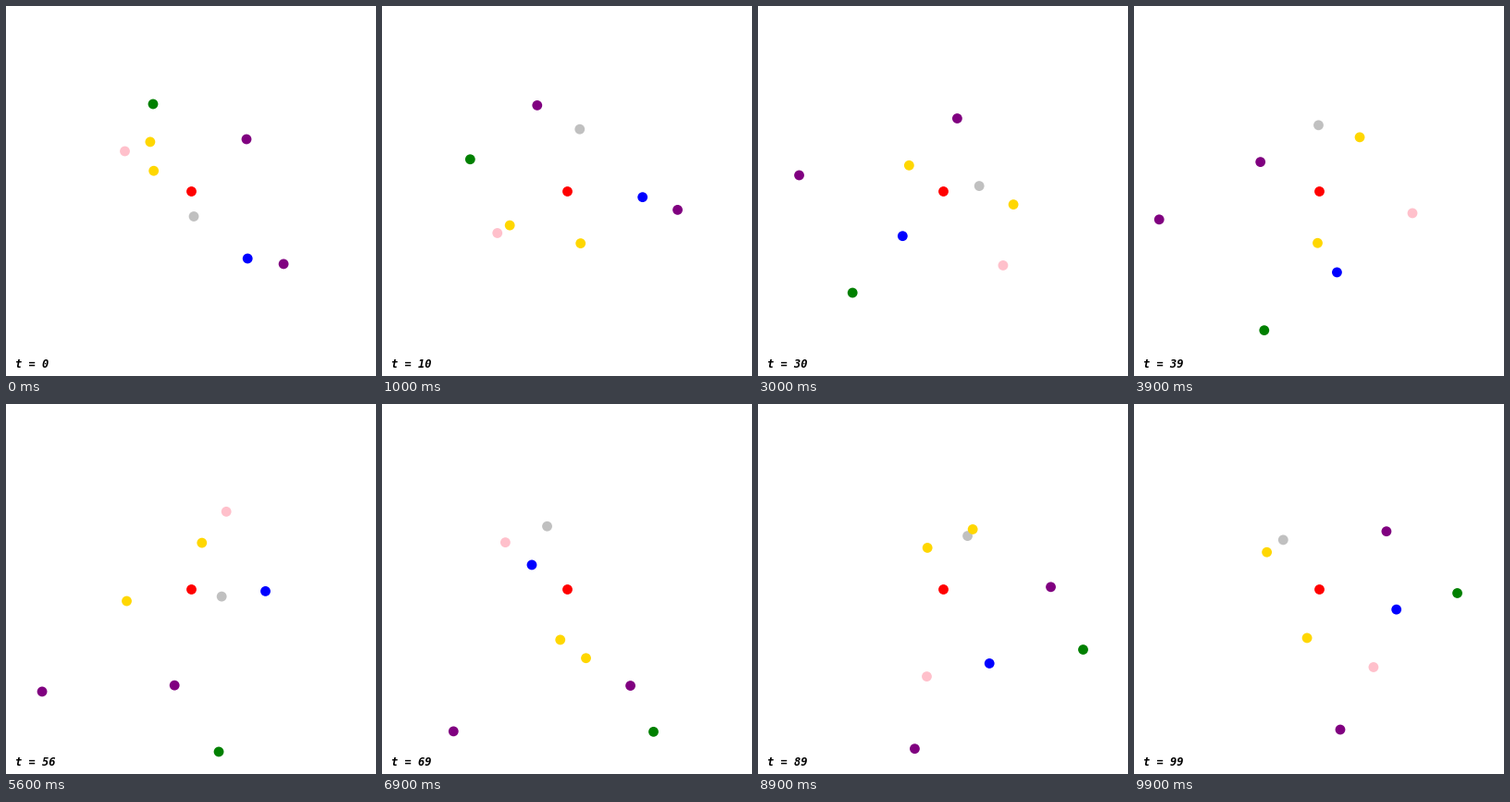
Recreate the animation shown at these times as a matplotlib script. Size 400x400 px, loop 10000 ms.

```python
import numpy as np
import matplotlib.pyplot as plt
from matplotlib.animation import FuncAnimation
from matplotlib.patches import Circle

SIZE = 400
FRAMES = 100
SUBSTEPS = 10
DT = 1 / SUBSTEPS
GM = 6674
SUN = np.array([200.5, 199.5])
RADIUS = 5.4

# colour, start offset from the sun, tangential start speed
PLANETS = [
    ("silver", 2.55, -27.0, 18.911),
    ("gold", -40.8, 22.3, 12.787),
    ("gold", -44.6, 53.6, 10.039),
    ("blue", 60.7, -72.5, 6.813),
    ("pink", -72.0, 43.5, 9.358),
    ("green", -41.5, 94.5, 9.068),
    ("purple", 59.5, 56.5, 10.722),
    ("purple", 99.6, -78.4, 6.148),
]


def simulate():
    """Positions of all planets per frame, shape (frames, planets, 2)."""
    pos = np.array([p[1:3] for p in PLANETS])
    speed = np.array([[p[3]] for p in PLANETS])
    normal = np.column_stack([-pos[:, 1], pos[:, 0]])
    vel = speed * normal / np.linalg.norm(pos, axis=1, keepdims=True)
    track = []
    for _ in range(FRAMES):
        track.append(SUN + pos)
        for _ in range(SUBSTEPS):
            dist = np.linalg.norm(pos, axis=1, keepdims=True)
            vel = vel - GM * pos / dist**3 * DT
            pos = pos + vel * DT
    return np.array(track)


track = simulate()

fig = plt.figure(figsize=(4, 4), dpi=100, facecolor="white")
ax = fig.add_axes([0, 0, 1, 1])
ax.set_xlim(0, SIZE)
ax.set_ylim(0, SIZE)
ax.axis("off")


def dot(center, color):
    return ax.add_patch(Circle(center, RADIUS, facecolor=color, linewidth=0))


dot(SUN, "red")
dots = [dot(xy, p[0]) for xy, p in zip(track[0], PLANETS)]
label = ax.text(10, 9, "t = 0", family="DejaVu Sans Mono", weight="bold",
                style="oblique", size=8.64, color="black", va="baseline")


def update(t):
    for d, xy in zip(dots, track[t]):
        d.center = xy
    label.set_text(f"t = {t}")
    return [*dots, label]


anim = FuncAnimation(fig, update, frames=FRAMES, interval=100, repeat=True,
                     repeat_delay=0, blit=False)
plt.show()
```
